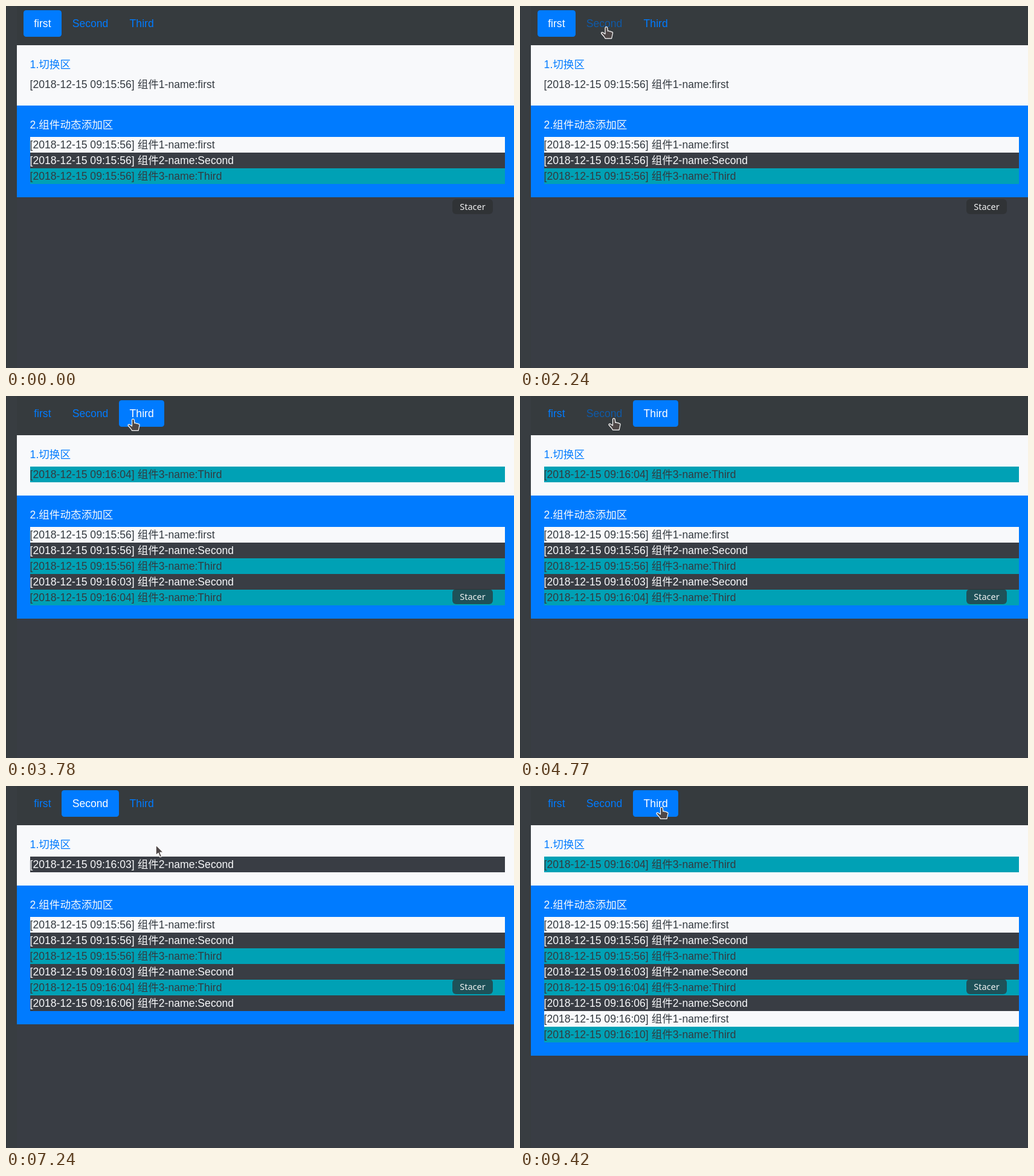
An HTML page that plays this animation: 841 px wide and 600 px high, repeating every 9560 ms.

```html
<!DOCTYPE html>
<html lang="zh-CN">
<head>
<meta charset="utf-8">
<title>Tabs</title>
<style>
html, body { margin: 0; width: 100%; height: 100%; overflow: hidden; background: #393d44; }
svg { display: block; width: 841px; height: 600px; }
text { font: 17.6px "Liberation Sans", Arial, "Noto Sans CJK SC", "Noto Sans CJK", sans-serif; white-space: pre; }
.tip { font: 14.5px "Noto Sans", "Open Sans", sans-serif; }
</style>
</head>
<body>
<svg id="stage" viewBox="0 0 841 600"></svg>
<script>
const LOOP = 9560, REM = 17.6, LINE = 26, TEXT_X = 39.6;
const BLUE = '#007bff', LIGHT = '#f8f9fb', DARK = '#393d44', TEAL = '#00a1b5', INK = '#343a40';

const tabs = [
  { name: 'first', fill: LIGHT, ink: INK },
  { name: 'Second', fill: DARK, ink: LIGHT },
  { name: 'Third', fill: TEAL, ink: INK }
];

const clicks = [
  { at: 2550, tab: 1 },
  { at: 3780, tab: 2 },
  { at: 5640, tab: 1 },
  { at: 8090, tab: 0 },
  { at: 9420, tab: 2 }
];
// every tab is logged once on load, then again on each click
const log = [...tabs.map((_, tab) => ({ at: 0, tab })), ...clicks];

// the pointer rests between moves
const home = { x: 335, y: 518 };
const moves = [
  { from: 520, to: 1500, x: 65, y: 29 },
  { from: 1850, to: 2240, x: 143, y: 34.5 },
  { from: 2750, to: 3260, x: 210.5, y: 38 },
  { from: 4430, to: 4770, x: 155.5, y: 37 },
  { from: 5800, to: 6190, x: 52, y: 34 },
  { from: 6330, to: 6700, x: 33, y: 159 },
  { from: 6700, to: 7280, x: 251, y: 97 },
  { from: 7310, to: 7880, x: 57.5, y: 41 },
  { from: 8180, to: 8700, x: 234.5, y: 35 }
];

const svg = document.getElementById('stage');

function add(tag, attrs, content) {
  const el = document.createElementNS('http://www.w3.org/2000/svg', tag);
  for (const key in attrs) el.setAttribute(key, attrs[key]);
  if (content) el.textContent = content;
  svg.appendChild(el);
  return el;
}
const set = (el, key, value) => {
  if (el.getAttribute(key) !== String(value)) el.setAttribute(key, value);
};
const rect = (x, y, width, height, fill, rx = 0) => add('rect', { x, y, width, height, fill, rx });
const label = (x, y, fill, content) => add('text', { x, y, fill }, content);
const show = (el, on) => set(el, 'visibility', on ? 'visible' : 'hidden');

function clock(at) {
  if (!at) return '15:56';
  return '16:' + String(Math.floor(at / 1000) + 1).padStart(2, '0');
}

function row(y, { at, tab }) {
  const t = tabs[tab];
  return [
    rect(40, y, 786, LINE, t.fill),
    label(TEXT_X, y + 19, t.ink, `[2018-12-15 09:${clock(at)}] 组件${tab + 1}-name:${t.name}`)
  ];
}

rect(0, 0, 841, 600, DARK);
rect(0, 0, 18, 600, '#383d41');
rect(0, 0, 1, 600, '#303539');
rect(18, 0, 823, 65, '#363b3e');

let left = 28.6;
for (const t of tabs) {
  t.box = rect(0, 7, 0, 44, BLUE, REM / 4);
  t.text = label(left + REM, 35, BLUE, t.name);
  const right = left + t.text.getComputedTextLength() + 2 * REM;
  t.x = Math.round(left);
  t.end = Math.round(right);
  set(t.box, 'x', t.x);
  set(t.box, 'width', t.end - t.x);
  left = right;
}

// each tab's view keeps the time of its first opening
rect(18, 65, 823, 100, LIGHT);
label(TEXT_X, 103, BLUE, '1.切换区');
tabs.forEach((t, tab) => {
  const opened = tab ? clicks.find(c => c.tab === tab).at : 0;
  t.view = row(117, { at: opened, tab });
});

const panel = rect(18, 165, 823, 0, BLUE);
label(TEXT_X, 203, LIGHT, '2.组件动态添加区');
const rows = log.map((entry, i) => row(217 + LINE * i, entry));

rect(739, 320, 67, 25, 'rgba(45,47,49,.7)', 6);
add('text', { x: 772.5, y: 338, fill: '#f0f1f1', class: 'tip', 'text-anchor': 'middle' }, 'Stacer');

const skin = { fill: '#4e4747', stroke: '#fff', 'stroke-width': 1.2, 'stroke-linejoin': 'round' };
const hand = add('path', {
  ...skin,
  d: 'M-2 2C-2-.4 1.6-.4 1.8 2L2.4 7.2Q4.4 6 5.4 7.8Q7.4 6.8 8.2 8.6Q10.6 8 10.6 10.2L9.6 15L8.6 19.4H-1.8L-4 16L-8.4 11Q-8.6 8.6-6 9.2L-2 12Z'
});
const arrow = add('path', { ...skin, d: 'M0 0V17L4 13.4L6.7 20L9.5 18.8L6.8 12.4H12.2Z' });

function pointer(t) {
  let { x, y } = home;
  for (const m of moves) {
    const p = Math.min(1, Math.max(0, (t - m.from) / (m.to - m.from)));
    const e = p * p * (3 - 2 * p);
    x += (m.x - x) * e;
    y += (m.y - y) * e;
  }
  return { x, y };
}

function draw(t) {
  const count = log.filter(entry => entry.at <= t).length;
  const active = count > tabs.length ? log[count - 1].tab : 0;
  const seen = t >= moves[0].from;
  const { x, y } = pointer(t);
  const over = seen && y >= 7 && y < 51 ? tabs.findIndex(b => x >= b.x && x < b.end) : -1;

  tabs.forEach((b, i) => {
    show(b.box, i === active);
    set(b.text, 'fill', i === active ? '#fff' : i === over ? '#0f5aa8' : BLUE);
    b.view.forEach(el => show(el, i === active));
  });
  rows.forEach((parts, i) => parts.forEach(el => show(el, i < count)));
  set(panel, 'height', 74 + LINE * count);

  show(hand, seen && over >= 0);
  show(arrow, seen && over < 0);
  set(over >= 0 ? hand : arrow, 'transform', `translate(${x} ${y})`);
}

const start = performance.now();
function tick() {
  draw((performance.now() - start) % LOOP);
  requestAnimationFrame(tick);
}
tick();
</script>
</body>
</html>
```
